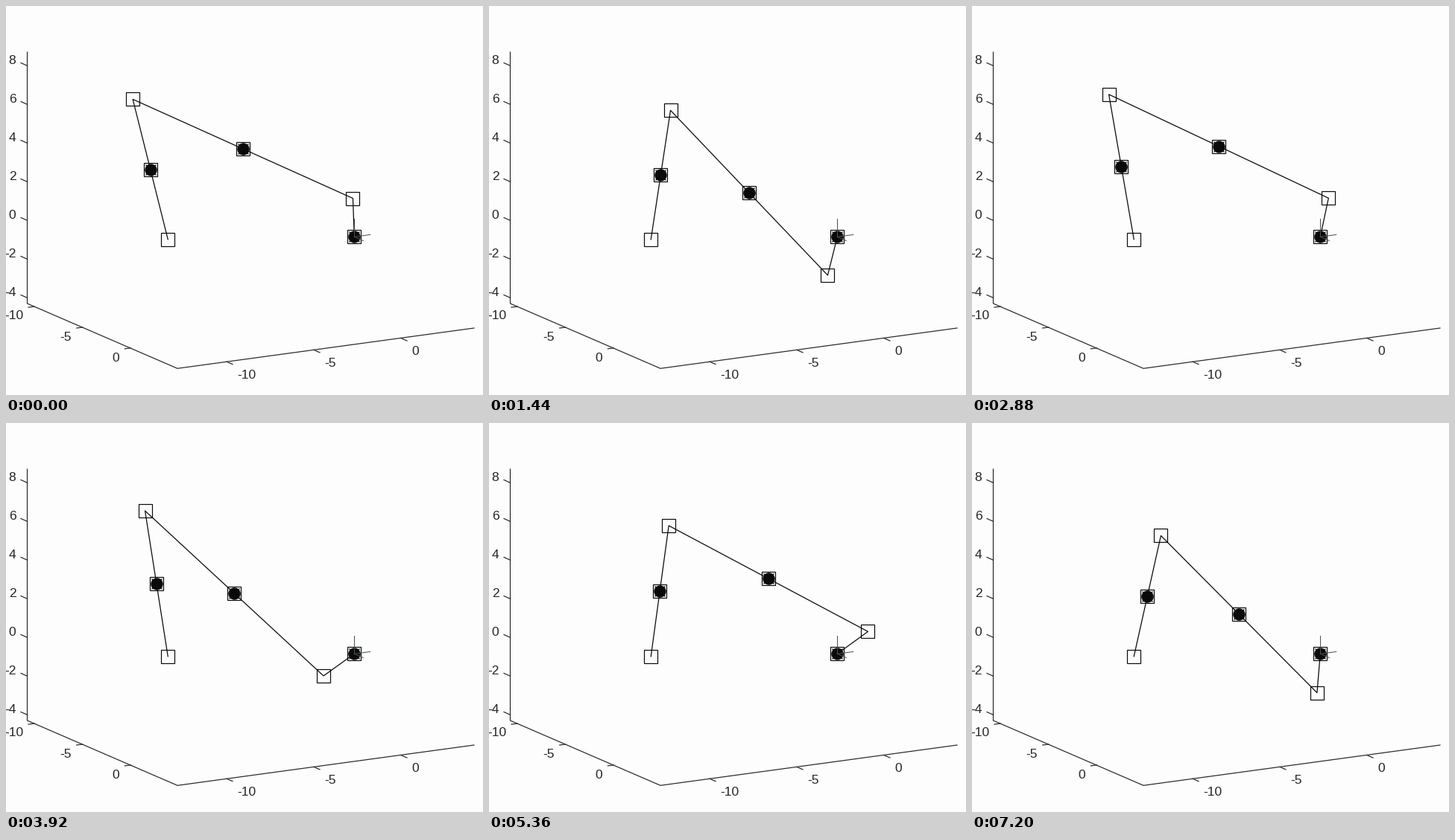
Recreate the animation shown at these times as a matplotlib script. Size 640 by 523 pixels, loop 7280 ms.

```python
import numpy as np
import matplotlib.pyplot as plt
from matplotlib.animation import FuncAnimation

W, H, DPI = 640, 523, 100
FRAMES, INTERVAL = 91, 80
PX = 72 / DPI  # points per pixel
INK, AXIS, TRIAD = "#0a0a0a", "#262626", "#4a5050"

# Oblique view: screen position of the origin and of one unit along x, y, z
ORIGIN = np.array([467.3, 310.3])
BASIS = np.array([[23.3, -3.1], [13.0, 5.7], [0.0, -26.0]])

# Spatial four-bar: crank turns in the xz plane, rocker swings in the yz plane
CRANK, COUPLER, ROCKER = 2.0, 12.2, 7.4
BASE = np.array([-8.5, -4.0, 0.0])

# Crank angle in degrees at chosen steps; it starts slowly, then runs on
STEPS = [0, 4, 10, 18, 36, 40, 49, 67, 70, 78, 90]
ANGLES = [92.3, 113, 169, 254, 436.3, 476, 567.7, 748, 775.5, 855.5, 984.6]


def project(p):
    return ORIGIN + np.asarray(p, float) @ BASIS


def linkage(step):
    """Crank pin and rocker pin in space."""
    t = np.radians(np.interp(step, STEPS, ANGLES))
    pin = CRANK * np.array([np.cos(t), 0, np.sin(t)])
    # closure: a sin(f) + b cos(f) = k for the rocker angle f
    d = pin - BASE
    a, b = 2 * ROCKER * d[1], 2 * ROCKER * d[2]
    k = d @ d + ROCKER ** 2 - COUPLER ** 2
    f = np.arcsin(k / np.hypot(a, b)) - np.arctan2(b, a)
    top = BASE + ROCKER * np.array([0, np.sin(f), np.cos(f)])
    return pin, top


fig = plt.figure(figsize=(W / DPI, H / DPI), dpi=DPI, facecolor="#fdfdfd")
ax = fig.add_axes([0, 0, 1, 1])
ax.set_xlim(0, W)
ax.set_ylim(H, 0)
ax.axis("off")


def line(points, color=AXIS, width=1.2, **kw):
    x, y = np.transpose(points)
    return ax.plot(x, y, color=color, lw=width * PX, **kw)[0]


def label(x, y, text, ha):
    ax.text(x, y, text, ha=ha, va="center", color=AXIS,
            family="Liberation Sans", fontsize=17.5 * PX)


def draw_axes():
    corner, left, right = (230, 487.3), (28.5, 400), (628, 433)
    line([(28.5, 62), left, corner, right])
    for z in range(-4, 9, 2):
        y = 288.3 - 26 * z
        line([(28.5, y), (20, y - 3.8)])
        label(13.5, y - 7, str(z), "right")
    for i, v in enumerate((-10, -5, 0)):
        x, y = 38 + 64.7 * i, 404 + 27.9 * i
        line([(x, y), (x - 8, y + 1.1)])
        label(x - 15, y + 12.5 + 0.6 * i, str(v), "right")
        x, y = 296 + 117 * i, 478.2 - 15.8 * i
        line([(x, y), (x + 8, y + 3.5)])
        label(x + 14.5, y + 18, str(v), "left")


def markers(style, size, fill="none", width=1.2, z=3):
    return ax.plot([], [], ls="none", marker=style, ms=size * PX, mfc=fill,
                   mec=INK, mew=width * PX, zorder=z)[0]


draw_axes()
links = line([(0, 0)], INK, 1.25, zorder=2)
joints = markers("s", 17.3)
masses = [markers("s", 17.3), markers("o", 15.2, INK), markers("x", 14)]
for axis in np.eye(3):
    line([project((0, 0, 0)), project(0.92 * axis)], TRIAD, 1, zorder=4)


def draw(step):
    pin, top = linkage(step)
    hub, pin, top, base = map(project, (np.zeros(3), pin, top, BASE))
    links.set_data(*np.transpose([hub, pin, top, base]))
    joints.set_data(*np.transpose([pin, top, base]))
    centres = np.transpose([hub, (pin + top) / 2, (top + base) / 2])
    for m in masses:
        m.set_data(*centres)
    return [links, joints, *masses]


anim = FuncAnimation(fig, draw, frames=FRAMES, interval=INTERVAL,
                     repeat=True, repeat_delay=0, blit=False)
plt.show()
```
